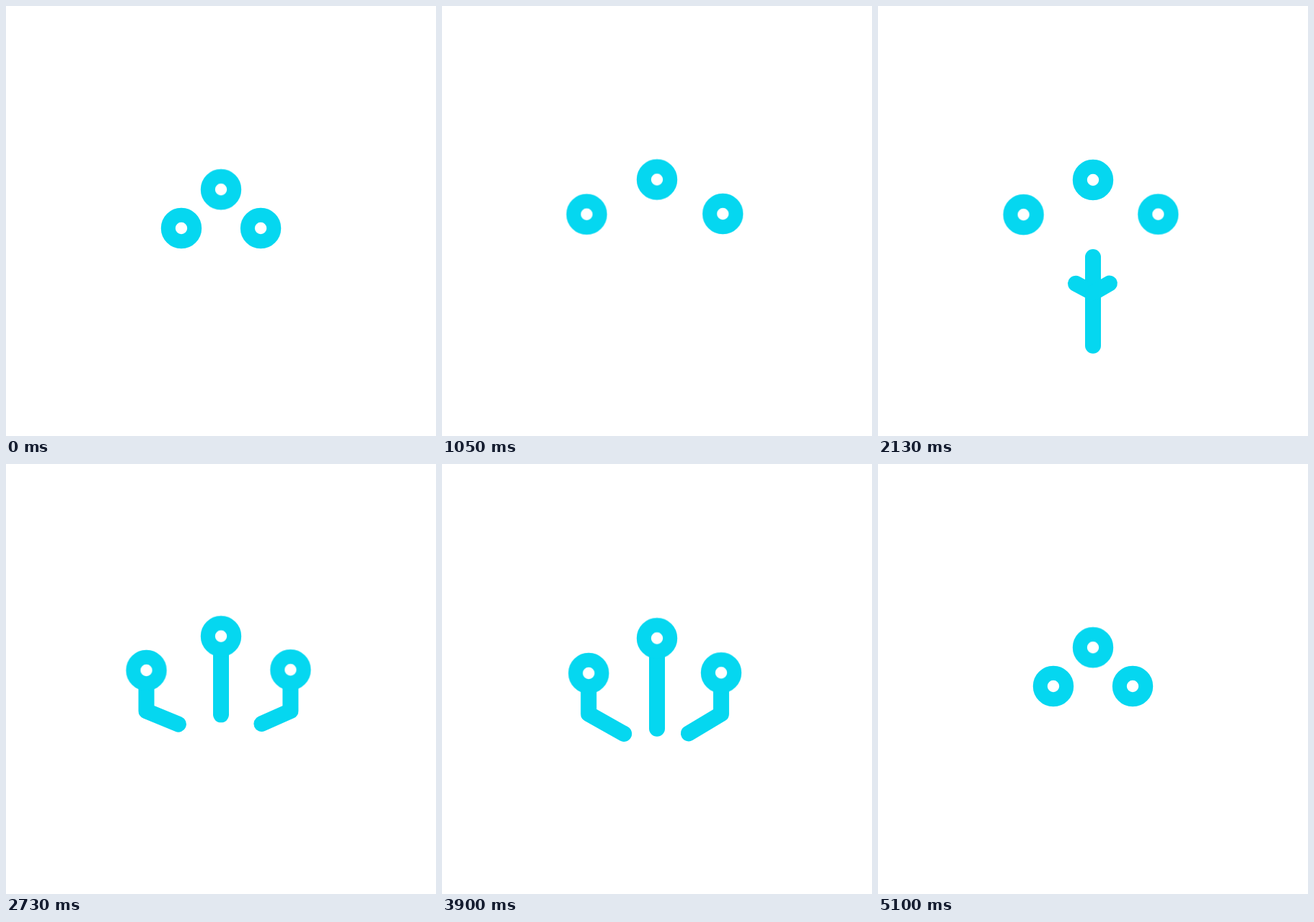
An HTML page without scripts that plays this animation: 596 by 596 pixels, repeating every 5400 ms.

```html
<!DOCTYPE html>
<html lang="en">
<head>
<meta charset="utf-8">
<title>Branching nodes</title>
<style>
  html, body { margin: 0; height: 100%; overflow: hidden; background: #fff; }
  svg { display: block; width: 100vw; height: 100vh; }

  svg * {
    --loop: 5400ms;
    --ease: cubic-bezier(.333, 0, .667, 1);
  }
  .ring { fill: #fff; stroke: #05d7f0; stroke-width: 20; animation: var(--move) var(--loop) var(--ease) infinite; }
  .stem {
    fill: none; stroke: #05d7f0; stroke-width: 22;
    stroke-linecap: round; stroke-linejoin: round;
    stroke-dasharray: 1 3; stroke-dashoffset: 1.02;
    animation: var(--shape) var(--loop) var(--ease) infinite,
               var(--flow) var(--loop) linear var(--wait, 0ms) infinite backwards;
  }
  .second { --wait: 1200ms; }
  .trunk { --flow: trunk-flow; }
  .branch { --flow: branch-flow; }

  /* Nodes breathe outwards three times, then settle. */
  @keyframes left {
    0%, 94.444%, to { transform: translate(243px, 308px); }
    33.333%, 55.556% { transform: translate(175px, 277px); }
    44.444% { transform: translate(221.2px, 298.1px); }
    66.667% { transform: translate(231.8px, 302.9px); }
    77.778% { transform: translate(175px, 277px); animation-timing-function: cubic-bezier(.33, 0, .48, 1); }
  }
  @keyframes top {
    0%, 94.444%, to { transform: translate(298px, 254.3px); }
    33.333%, 55.556% { transform: translate(298px, 232.3px); }
    44.444% { transform: translate(298px, 247.3px); }
    66.667% { transform: translate(298px, 250.7px); }
    77.778% { transform: translate(298px, 232.3px); animation-timing-function: cubic-bezier(.33, 0, .48, 1); }
  }
  @keyframes right {
    0%, 94.444%, to { transform: translate(353px, 308px); }
    33.333%, 55.556% { transform: translate(411px, 276px); }
    44.444% { transform: translate(371.6px, 297.8px); }
    66.667% { transform: translate(362.6px, 302.7px); }
    77.778% { transform: translate(411px, 276px); animation-timing-function: cubic-bezier(.33, 0, .48, 1); }
  }

  /* Stems keep their upper ends on the moving nodes. */
  @keyframes trunk-1 {
    0%, 33.333% { d: path("M298 488 L298 232"); }
    44.444% { d: path("M298 458 L298 247"); }
    55.556%, to { d: path("M298 458 L298 232"); }
  }
  @keyframes left-1 {
    0%, 33.333% { d: path("M298 415 L175 333 L175 277"); }
    44.444% { d: path("M298 385 L221.2 355 L221.2 298"); }
    55.556%, to { d: path("M298 385 L175 333 L175 277"); }
  }
  @keyframes right-1 {
    0%, 33.333% { d: path("M298 415 L411 333 L411 276"); }
    44.444% { d: path("M298 385 L371.6 355 L371.6 298"); }
    55.556%, to { d: path("M298 385 L411 333 L411 276"); }
  }
  @keyframes trunk-2 {
    0%, 55.556% { d: path("M298 488 L298 232"); }
    66.667% { d: path("M298 454 L298 250.5"); }
    77.778%, to { d: path("M298 490 L298 232"); }
  }
  @keyframes left-2 {
    0%, 55.556% { d: path("M298 415 L175 333 L175 277"); }
    66.667% { d: path("M298 380 L231.8 360 L231.8 303"); }
    77.778%, to { d: path("M298 419 L175 333 L175 277"); }
  }
  @keyframes right-2 {
    0%, 55.556% { d: path("M298 415 L411 333 L411 276"); }
    66.667% { d: path("M298 380 L362.6 360 L362.6 303"); }
    77.778%, to { d: path("M298 419 L411 333 L411 276"); }
  }

  /* A dash as long as the path grows in, then drains into the node. */
  @keyframes trunk-flow {
    0%, 33.333% { stroke-dashoffset: 1.02; }
    44.63% { stroke-dashoffset: 0; }
    56.667%, to { stroke-dashoffset: -1.02; }
  }
  @keyframes branch-flow {
    0%, 37.778% { stroke-dashoffset: 1.02; }
    47.13% { stroke-dashoffset: 0; }
    56.389%, to { stroke-dashoffset: -1.02; }
  }
</style>
</head>
<body>
<svg viewBox="0 0 596 596">
  <path class="stem trunk" style="--shape: trunk-1" pathLength="1" d="M298 488 L298 232"/>
  <path class="stem branch" style="--shape: left-1" pathLength="1" d="M298 415 L175 333 L175 277"/>
  <path class="stem branch" style="--shape: right-1" pathLength="1" d="M298 415 L411 333 L411 276"/>

  <path class="stem trunk second" style="--shape: trunk-2" pathLength="1" d="M298 488 L298 232"/>
  <path class="stem branch second" style="--shape: left-2" pathLength="1" d="M298 415 L175 333 L175 277"/>
  <path class="stem branch second" style="--shape: right-2" pathLength="1" d="M298 415 L411 333 L411 276"/>

  <circle class="ring" style="--move: left" r="18.2"/>
  <circle class="ring" style="--move: top" r="18.2"/>
  <circle class="ring" style="--move: right" r="18.2"/>
</svg>
</body>
</html>
```
